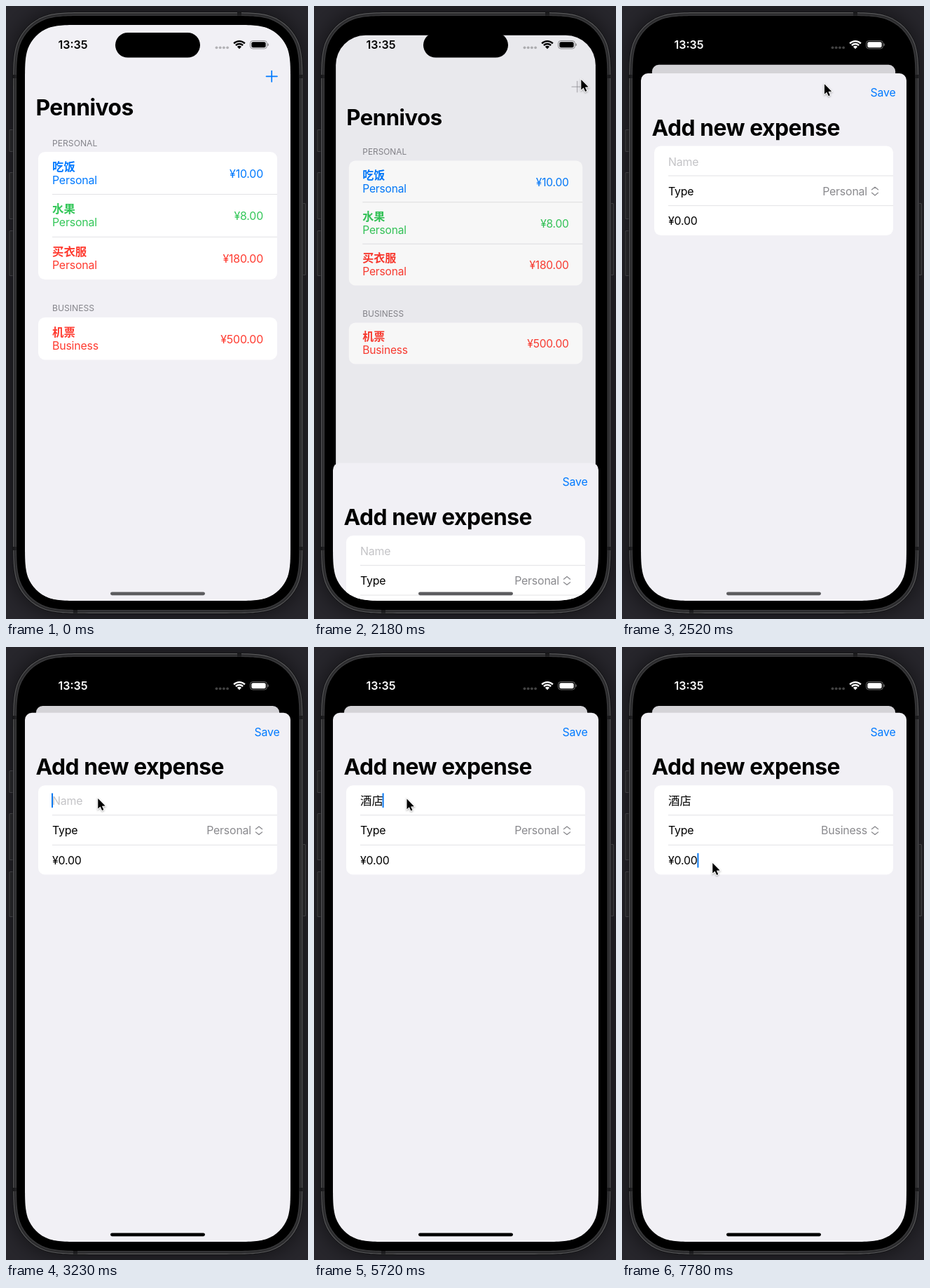
Animation, 431 px wide and 874 px high, one loop 8000 ms. Source, as an HTML page with a canvas:

```html
<!DOCTYPE html>
<html lang="zh-Hans">
<head>
<meta charset="utf-8">
<title>Expense list</title>
<style>
html, body { margin: 0; width: 100%; height: 100%; overflow: hidden; background: #28272d; }
canvas { display: block; width: 431px; height: 874px; }
</style>
</head>
<body>
<canvas id="stage"></canvas>
<script>
const W = 431, H = 874, LOOP = 8000;
const canvas = document.getElementById('stage');
const ctx = canvas.getContext('2d');
const dpr = window.devicePixelRatio || 1;
canvas.width = W * dpr;
canvas.height = H * dpr;

const BLUE = '#007aff', GREEN = '#34c759', RED = '#ff3b30';
const PAPER = '#f1f0f5', LINE = '#e2e2e5', GRAY = '#8a8a8e';
const FONT = 'Inter, "Noto Sans CJK SC", "Noto Sans CJK", sans-serif';
const BODY = 15.9, HAN = 16.4;
const SCREEN = { x: 27, y: 27, w: 379, h: 821, r: 54 };

// Moments of the story, in ms
const PRESS = 2090, SHEET = 2132.7, FOCUS = 3230, COMMIT = 5180;
const MENU_OPEN = 6340, MENU_CLOSE = 7170, BLUR = 7690, AMOUNT = 7780;

// Pointer path: time, x, y
const PATH = [
  [1000, 434, 172], [1180, 402, 136], [1420, 384, 116], [1600, 384, 116],
  [1690, 382, 110], [1830, 380, 104], [2290, 380, 104], [2520, 288, 110],
  [2710, 208, 160], [2890, 146, 201], [2990, 130, 215], [5710, 130, 215],
  [5890, 246, 270], [6010, 246, 270], [6300, 298, 253], [6930, 298, 253],
  [7120, 205, 299], [7300, 205, 299], [7640, 128, 307]
];

// Input method states: time, typed text, three candidates
const TYPED = [
  [3800, 'j', '就', '将', '及'],
  [3910, 'ji', '及', '几', '级'],
  [4040, 'jiu', '就', '酒', '九'],
  [4450, 'jiu d', '酒店', null, '久的'],
  [4540, 'jiu di', '酒店', null, '旧地'],
  [4640, 'jiu dia', '酒店', null, '久的'],
  [4740, 'jiu dian', '酒店', null, '九点']
];

const clamp = v => Math.max(0, Math.min(1, v));
const lerp = (a, b, p) => a + (b - a) * p;

// Critically damped spring, w per ms
function spring(t, w) {
  if (t <= 0) return 0;
  return 1 - (1 + w * t) * Math.exp(-w * t);
}

function slope(i, k) {
  const a = PATH[i - 1], b = PATH[i], c = PATH[i + 1];
  if (!a || !c) return 0;
  if ((b[k] - a[k]) * (c[k] - b[k]) <= 0) return 0;
  return (c[k] - a[k]) / (c[0] - a[0]);
}

function pointerAt(t) {
  const last = PATH[PATH.length - 1];
  if (t <= PATH[0][0]) return [PATH[0][1], PATH[0][2]];
  if (t >= last[0]) return [last[1], last[2]];
  const i = PATH.findIndex(p => p[0] > t) - 1;
  const a = PATH[i], b = PATH[i + 1], d = b[0] - a[0], u = (t - a[0]) / d;
  const u2 = u * u, u3 = u2 * u;
  return [1, 2].map(k =>
    (2 * u3 - 3 * u2 + 1) * a[k] + (u3 - 2 * u2 + u) * d * slope(i, k) +
    (3 * u2 - 2 * u3) * b[k] + (u3 - u2) * d * slope(i + 1, k));
}

function rr(x, y, w, h, r) {
  ctx.beginPath();
  ctx.roundRect(x, y, w, h, r);
}

// Rounded rectangle whose corners ease into the sides
function smoothRect(x, y, w, h, r) {
  const corners = [[x, y, 0, 1, 1, 0], [x + w, y, -1, 0, 0, 1],
    [x + w, y + h, 0, -1, -1, 0], [x, y + h, 1, 0, 0, -1]];
  ctx.beginPath();
  for (const [cx, cy, ax, ay, bx, by] of corners) {
    const at = (a, b) => [cx + r * (ax * a + bx * b), cy + r * (ay * a + by * b)];
    ctx.lineTo(...at(1.529, 0));
    ctx.bezierCurveTo(...at(1.088, 0), ...at(0.868, 0), ...at(0.631, 0.075));
    ctx.bezierCurveTo(...at(0.373, 0.169), ...at(0.169, 0.373), ...at(0.075, 0.631));
    ctx.bezierCurveTo(...at(0, 0.868), ...at(0, 1.088), ...at(0, 1.529));
  }
  ctx.closePath();
}

function box(x, y, w, h, r, color) {
  rr(x, y, w, h, r);
  ctx.fillStyle = color;
  ctx.fill();
}

function rect(x, y, w, h, color) {
  ctx.fillStyle = color;
  ctx.fillRect(x, y, w, h);
}

function poly(points, color, width) {
  ctx.beginPath();
  points.forEach(([x, y], i) => i ? ctx.lineTo(x, y) : ctx.moveTo(x, y));
  ctx.strokeStyle = color;
  ctx.lineWidth = width;
  ctx.lineCap = ctx.lineJoin = 'round';
  ctx.stroke();
}

function setFont(size, weight, track) {
  ctx.font = `${weight} ${size}px ${FONT}`;
  ctx.letterSpacing = (size * track).toFixed(2) + 'px';
}

function text(s, x, y, color, { size = BODY, weight = 400, track = -0.012, align = 'left' } = {}) {
  setFont(size, weight, track);
  ctx.textAlign = align;
  ctx.textBaseline = 'alphabetic';
  ctx.fillStyle = color;
  ctx.fillText(s, x, y);
}

function heading(s, x, y) {
  text(s, x, y, '#000', { size: 31.8, weight: 700, track: -0.015 });
}

function han(s, x, y, color, size = HAN, weight = 400) {
  text(s, x, y, color, { size, weight, track: 0 });
}

// One layer of the phone body, inset from its outer edge
function shell(inset, color) {
  smoothRect(9.5 + inset, 8.5 + inset, 414.5 - inset * 2, 858 - inset * 2, 71.5 - inset);
  ctx.fillStyle = color;
  ctx.fill();
}

function drawDevice() {
  rect(0, 0, W, H, '#28272d');
  ctx.save();
  ctx.shadowColor = 'rgba(0,0,0,.6)';
  ctx.shadowBlur = 34 * dpr;
  shell(0, '#131315');
  ctx.restore();
  for (const [x, y, h] of [[4.5, 176, 32], [4.5, 237, 67], [4.5, 320, 65], [421, 281, 103]]) {
    box(x, y, 7, h, 1.5, '#3e3e41');
    box(x + 1, y + 1, 5, h - 2, 1, '#222225');
  }
  shell(0, '#131315');
  shell(0.6, '#58585a');
  shell(1.7, '#2b2b2d');
  shell(4.2, '#3a3a3c');
  shell(5.5, '#000');
  for (const y of [98, 771]) {
    rect(10, y, 4.5, 5, '#1b1b1d');
    rect(418.8, y, 4.5, 5, '#1b1b1d');
  }
  rect(330, 9, 6, 4.5, '#1b1b1d');
  rect(96, 861, 6, 4.5, '#1b1b1d');
}

function drawStatus(v) {
  const c = a => `rgba(${v},${v},${v},${a})`;
  text('13:35', 74.5, 61, c(1), { weight: 600, size: 16, track: 0 });
  ctx.fillStyle = c(0.26);
  for (let i = 0; i < 4; i++) {
    ctx.beginPath();
    ctx.arc(300.5 + i * 5.2, 59.3, 1.9, 0, 7);
    ctx.fill();
  }
  const from = -Math.PI * 0.75, to = -Math.PI * 0.25;
  ctx.strokeStyle = c(1);
  ctx.lineWidth = 2.4;
  ctx.lineCap = 'butt';
  for (const r of [11.1, 7.2]) {
    ctx.beginPath();
    ctx.arc(333, 61.2, r, from, to);
    ctx.stroke();
  }
  ctx.beginPath();
  ctx.moveTo(333, 61.2);
  ctx.arc(333, 61.2, 4.4, from, to);
  ctx.fillStyle = c(1);
  ctx.fill();
  rr(348.5, 49.5, 24, 11.4, 3.8);
  ctx.strokeStyle = c(0.4);
  ctx.lineWidth = 1;
  ctx.stroke();
  box(350.3, 51.2, 20.4, 8, 2.3, c(1));
  box(373.5, 53.3, 1.4, 3.8, [0, 1.4, 1.4, 0], c(0.45));
}

function drawExpense(y, name, type, sum, color) {
  han(name, 66, y + 27, color, HAN, 600);
  text(type, 66, y + 46, color);
  text(sum, 367, y + 37, color, { align: 'right' });
}

function sectionLabel(s, y) {
  text(s, 66, y, '#85858b', { size: 12.15, track: 0 });
}

function drawList(pressed) {
  const plus = pressed ? 'rgba(130,130,136,.45)' : BLUE;
  poly([[371.5, 100.3], [387, 100.3]], plus, 1.7);
  poly([[379.2, 92.5], [379.2, 108]], plus, 1.7);
  heading('Pennivos', 42.5, 156);
  sectionLabel('PERSONAL', 199.5);
  box(46, 208, 341, 182, 9.6, '#fff');
  rect(66, 268, 321, 1, LINE);
  rect(66, 328.8, 321, 1, LINE);
  drawExpense(208, '吃饭', 'Personal', '¥10.00', BLUE);
  drawExpense(268.4, '水果', 'Personal', '¥8.00', GREEN);
  drawExpense(328.8, '买衣服', 'Personal', '¥180.00', RED);
  sectionLabel('BUSINESS', 435);
  box(46, 444, 341, 60.4, 9.6, '#fff');
  drawExpense(443.6, '机票', 'Business', '¥500.00', RED);
}

// The list screen, shrinking into a card behind the sheet
function drawCard(p, pressed) {
  const s = lerp(1, 0.916, p), top = lerp(27, 84, p);
  const w = SCREEN.w * s, x = 216.5 - w / 2;
  ctx.save();
  rr(x, top, w, SCREEN.h * s, lerp(SCREEN.r, 9.5, p));
  ctx.clip();
  rect(0, 0, W, H, PAPER);
  ctx.save();
  ctx.translate(x, top + 6.4 * p);
  ctx.scale(s, s);
  ctx.translate(-SCREEN.x, -SCREEN.y);
  drawList(pressed);
  ctx.restore();
  rect(0, 0, W, H, `rgba(0,0,0,${0.12 * p})`);
  ctx.restore();
}

function caret(x, y) {
  box(x - 1, y, 2, 21, 1, '#0a78f0');
}

function drawName(t, y) {
  const step = TYPED.filter(s => s[0] <= t).pop();
  let end = 66;
  if (t >= COMMIT) {
    han('酒店', 66, y + 28, '#000');
    end = 98.6;
  } else if (step) {
    setFont(BODY, 400, -0.03);
    end = 66 + ctx.measureText(step[1]).width;
    rect(66, y + 12, end - 66, 20, '#dfe2e7');
    text(step[1], 66, y + 27.7, '#000', { track: -0.03 });
  } else {
    text('Name', 66, y + 28, '#c4c4c7');
  }
  if (t >= FOCUS && t < BLUR) caret(end, y + 11);
}

function drawSheet(t, p, menu) {
  const top = lerp(848, 93.7, p), y = top + 103.5;
  box(27, top, 379, 900, 10, PAPER);
  text('Save', 390.5, top + 33, BLUE, { align: 'right' });
  heading('Add new expense', 42.5, top + 88.7);
  box(46, y, 341, 127.4, 9.6, '#fff');
  rect(66, y + 42, 321, 1, LINE);
  rect(66, y + 84.6, 321, 1, LINE);
  drawName(t, y);
  text('Type', 66, y + 70.2, '#000');
  ctx.save();
  ctx.globalAlpha = 1 - 0.45 * menu;
  text(t < MENU_CLOSE ? 'Personal' : 'Business', 350, y + 70.2, GRAY, { align: 'right' });
  ctx.restore();
  poly([[356.5, y + 62.3], [361, y + 58.7], [365.5, y + 62.3]], GRAY, 1.3);
  poly([[356.5, y + 66.8], [361, y + 70.4], [365.5, y + 66.8]], GRAY, 1.3);
  text('¥0.00', 66, y + 112.5, '#000');
  if (t >= AMOUNT) caret(108.4, y + 96.5);
}

function hotelIcon(x, y) {
  box(x, y + 5, 21, 15, 1, '#d8b49c');
  box(x + 4, y, 13, 20, 1, '#c98f76');
  rect(x + 7, y + 2, 2, 6, '#d9302c');
  rect(x + 12, y + 2, 2, 6, '#d9302c');
  rect(x + 8, y + 4, 5, 2, '#d9302c');
  for (let i = 0; i < 2; i++) {
    for (const dx of [1.5, 6, 12, 17]) rect(x + dx, y + 10 + i * 4, 2.5, 2.3, '#7f94a5');
  }
  rect(x + 8.5, y + 16, 4, 4, '#6b4a3d');
}

function drawCandidates(t) {
  if (t < TYPED[0][0] || t >= COMMIT) return;
  const step = TYPED.filter(s => s[0] <= t).pop();
  ctx.save();
  ctx.shadowColor = 'rgba(0,0,0,.12)';
  ctx.shadowBlur = 4;
  ctx.shadowOffsetY = 1;
  box(65.5, 230, 300.5, 38.5, 5, '#fdfdfd');
  ctx.restore();
  rr(65.5, 230, 300.5, 38.5, 5);
  ctx.strokeStyle = '#dedee0';
  ctx.lineWidth = 1;
  ctx.stroke();
  box(68.5, 232.5, 81, 33.5, 4, '#e5e5e6');
  [[83, 96], [174, 192], [255.5, 269]].forEach(([nx, x], i) => {
    text(i + 1, nx, 254, '#b4b4b6', { size: 13 });
    const word = step[i + 2];
    if (word) han(word, x, 256.6, '#111', 19.5);
    else hotelIcon(x, 239);
  });
  poly([[340, 246.3], [346.8, 253], [353.6, 246.3]], '#151515', 1.8);
}

function drawMenu(m) {
  if (m < 0.004) return;
  const s = lerp(0.2, 1, m);
  ctx.save();
  ctx.globalAlpha = clamp(m * 1.6);
  ctx.translate(330, 282);
  ctx.scale(s, s);
  ctx.translate(-330, -282);
  ctx.save();
  ctx.shadowColor = `rgba(0,0,0,${0.22 * m})`;
  ctx.shadowBlur = 88 * dpr;
  box(123, 283, 243, 85, 11, '#f3f3f4');
  ctx.restore();
  rect(123, 325, 243, 1, '#dcdcde');
  text('Business', 154, 310, '#1a1a1a');
  text('Personal', 154, 352.8, '#1a1a1a');
  poly([[136, 347.8], [139.3, 351.8], [146.2, 342.6]], '#1a1a1a', 1.9);
  ctx.restore();
}

function drawPointer(t) {
  const [x, y] = pointerAt(t);
  ctx.save();
  ctx.translate(x + 1.3, y + 1);
  ctx.beginPath();
  [[0, 0], [0, 14.6], [3.3, 11.6], [5.8, 17], [8, 16], [5.6, 10.8], [10.3, 10.6]]
    .forEach(([a, b], i) => i ? ctx.lineTo(a, b) : ctx.moveTo(a, b));
  ctx.closePath();
  ctx.shadowColor = 'rgba(0,0,0,.35)';
  ctx.shadowBlur = 2.5;
  ctx.shadowOffsetY = 1;
  ctx.strokeStyle = '#fff';
  ctx.lineWidth = 1.8;
  ctx.lineJoin = 'miter';
  ctx.stroke();
  ctx.shadowColor = 'transparent';
  ctx.fillStyle = '#000';
  ctx.fill();
  ctx.restore();
}

function draw(t) {
  const p = spring(t - SHEET, 0.0205);
  const menu = spring(t - MENU_OPEN, 0.024) * (1 - spring(t - MENU_CLOSE, 0.024));
  ctx.setTransform(dpr, 0, 0, dpr, 0, 0);
  drawDevice();
  ctx.save();
  smoothRect(SCREEN.x, SCREEN.y, SCREEN.w, SCREEN.h, SCREEN.r);
  ctx.clip();
  drawCard(p, t >= PRESS);
  drawStatus(Math.round(255 * clamp((t - 2210) / 190)));
  box(156, 38, 121, 35.6, 17.8, '#000');
  if (p > 0) drawSheet(t, p, menu);
  drawCandidates(t);
  drawMenu(menu);
  box(149, 835.4, 135, 4.8, 2.4, t < FOCUS ? '#5c5c5f' : '#000');
  ctx.restore();
  drawPointer(t);
}

function tick() {
  draw(performance.now() % LOOP);
  requestAnimationFrame(tick);
}
tick();
</script>
</body>
</html>
```
